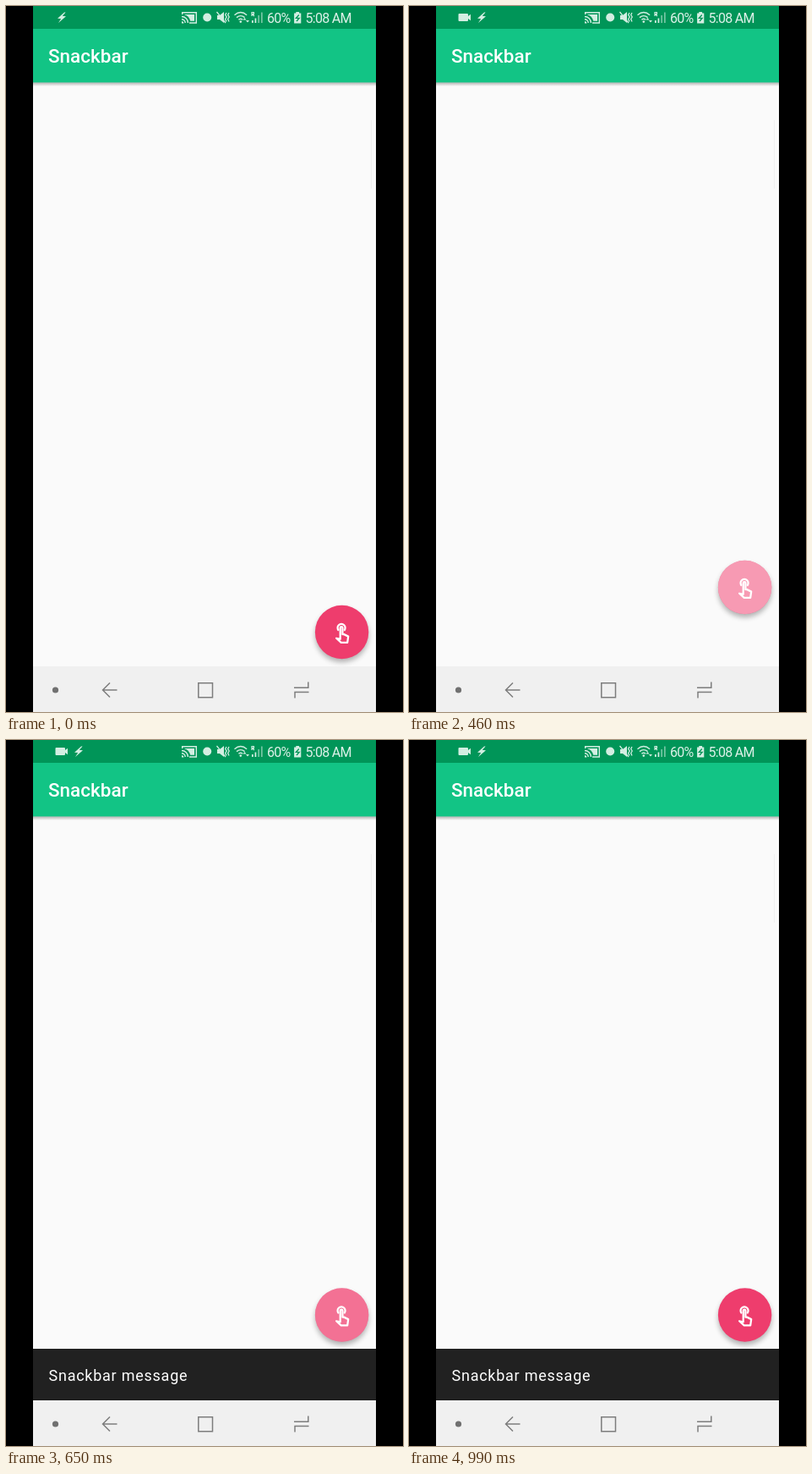
These frames come from a looping animation (470 px wide and 835 px high, 1050 ms). An HTML page:

```html
<!DOCTYPE html>
<html lang="en">
<head>
<meta charset="utf-8">
<title>Snackbar</title>
<style>
  html, body { margin: 0; width: 100%; height: 100%; overflow: hidden; background: #000; }
  svg { display: block; width: 470px; height: 835px; }
  text { font-family: Roboto, "Open Sans", sans-serif; fill: #fff; }
  .line { fill: none; }
</style>
</head>
<body>
<svg viewBox="0 0 470 835">
  <defs>
    <filter id="blur" x="-40%" y="-40%" width="180%" height="180%"><feGaussianBlur stdDeviation="3.2"/></filter>
    <linearGradient id="fade" x2="0" y2="1">
      <stop stop-color="#000" stop-opacity=".28"/><stop offset="1" stop-color="#000" stop-opacity="0"/>
    </linearGradient>
  </defs>

  <rect x="32" width="406" height="835" fill="#fafafa"/>
  <rect x="432" y="135" width="1" height="81" fill="#f0f0f0"/>
  <rect x="32" width="406" height="27" fill="#009558"/>
  <rect x="32" y="27" width="406" height="63.5" fill="#12c485"/>
  <rect x="32" y="90.5" width="406" height="4.5" fill="url(#fade)"/>
  <text x="50" y="67" font-size="22.5" font-weight="500">Snackbar</text>

  <!-- Status bar -->
  <g fill="#d3eee2" stroke="#d3eee2" stroke-width="0">
    <path id="bolt" d="M3 -6L-5 1.2L-.8 1.6L-4 6.5L5 -1.2L.8 -1.8L4.6 -6Z"/>
    <path id="camera" d="M59.5 9H69q1 0 1 1v2l3-2.2v7.4L70 15v2q0 1-1 1H59.5q-1 0-1-1v-7q0-1 1-1Z"/>
    <g stroke-width="1.4">
      <path class="line" d="M208.7 10V7.7H225.3V20H217M208 12.5a7.5 7.5 0 0 1 7.5 7.5M208 15.8a4.2 4.2 0 0 1 4.2 4.2"/>
      <path stroke="none" d="M211.5 10H223V17.8H218.3Q216.5 11.5 211.5 10.5ZM208 18v2.6h2.6Q210.4 18.2 208 18Z"/>
    </g>
    <circle cx="238.2" cy="13.5" r="5"/>
    <path d="M250 11h3l5-4v13l-5-4h-3Z"/>
    <path class="line" stroke-width="1.3" d="M249.5 7L260 20M261 8l-1.3 2.5l1.5 2.5l-1.5 2.5l1.3 3M264 8l-1.3 2.5l1.5 2.5l-1.5 2.5l1.3 3"/>
    <path class="line" stroke-width="1.4" d="M270.5 10.8q7.3-6.5 14.6 0M273 13.6q4.8-4 9.6 0M275.4 16.2q2.4-1.8 4.8 0"/>
    <circle cx="277.8" cy="18.6" r="1.3"/>
    <path d="M280.5 16.5l2-2.5l2 2.5ZM284 17l2 2.5l2-2.5Z"/>
    <path class="line" stroke-width="1.2" d="M291 12V7.5h2.4v2.2H291M292 9.8l1.8 2.2"/>
    <path d="M291 17h1.7v3H291ZM294.6 14.5h1.7V20h-1.7Z"/>
    <path opacity=".55" d="M298.3 11h1.7v9h-1.7ZM302 7.5h1.7V20H302Z"/>
    <path d="M343.3 7h3.8v1.5h2.2v12h-8.2v-12h2.2Z"/>
    <path class="line" stroke="#009558" stroke-width="1.3" d="M346.8 10.5l-3.4 3.8h3.8l-3.2 3.7"/>
  </g>
  <g font-size="16" letter-spacing="-.7" fill-opacity=".87">
    <text x="309" y="19.5">60%</text>
    <text x="354.5" y="19.5">5:08 AM</text>
  </g>

  <!-- Floating button -->
  <g id="fab">
    <circle cy="4" r="31.5" opacity=".3" filter="url(#blur)"/>
    <circle r="31.7" fill="#ee3d6d"/>
    <circle id="ripple" r="31.7" fill="#fff"/>
    <g class="line" stroke="#fff" stroke-width="2" stroke-linejoin="round" transform="translate(-13.5 -13.5) scale(1.128)">
      <path d="M8.7 10.4A4 4 0 1 1 14.3 10.4"/>
      <path d="M10.3 19.3V7.6a1.2 1.2 0 0 1 2.4 0V14.3h1.5l4.5 2.2l-.9 6.4H11.2L6.2 18.4Z"/>
    </g>
  </g>
  <circle id="touch" cx="396.3" r="11.8" fill="#f2f2f2" stroke="#c9c3c4" stroke-width="1"/>

  <g id="snack">
    <rect x="32" y="720" width="406" height="61" fill="#212121"/>
    <text x="50.5" y="757.5" font-size="18" letter-spacing=".75">Snackbar message</text>
  </g>

  <!-- Navigation bar -->
  <rect x="32" y="781" width="406" height="54" fill="#f0f0f0"/>
  <circle cx="58.5" cy="809" r="3.6" fill="#707070"/>
  <g class="line" stroke="#7d7d7d" stroke-width="1.5">
    <path d="M131.5 809H114.5M123 800.5L114.5 809L123 817.5"/>
    <path d="M232 817.8H227.8V800.8H244.5V817.8H239V817.8H232"/>
    <path d="M341 806.2H357.8V799.5M358.5 811.5H342V818.5"/>
  </g>
</svg>
<script>
const $ = id => document.getElementById(id);
const loop = 1050;
const ticks = [0, 80, 140, 200, 270, 330, 400, 460, 520, 580, 650, 720, 780, 860, 920, 990];

// Linear interpolation through [time, value] points
function track(t, points) {
  const i = points.findIndex(p => p[0] > t);
  if (i === 0) return points[0][1];
  if (i < 0) return points[points.length - 1][1];
  const [t0, a] = points[i - 1], [t1, b] = points[i];
  return a + (b - a) * (t - t0) / (t1 - t0);
}

function draw(t) {
  const boltX = track(t, [[50, 66], [200, 86]]);
  $("bolt").setAttribute("transform", `translate(${boltX} 13.5)`);
  $("camera").setAttribute("opacity", track(t, [[80, 0], [200, .75], [270, 1]]));

  const fabY = track(t, [[200, 740.5], [270, 735], [330, 720], [400, 700], [460, 687.5], [520, 681.5], [580, 680]]);
  $("fab").setAttribute("transform", `translate(397.6 ${fabY})`);
  $("ripple").setAttribute("opacity", track(t, [[270, 0], [330, .02], [460, .48], [580, .31], [780, .19], [990, 0]]));

  $("touch").setAttribute("cy", track(t, [[200, 742.5], [330, 747]]));
  $("touch").setAttribute("opacity", track(t, [[80, 0], [200, .85], [270, .75], [330, .52], [430, 0]]));
  $("snack").setAttribute("visibility", t >= 580 ? "visible" : "hidden");
}

function frame() {
  const now = performance.now() % loop;
  draw(ticks.findLast(tick => tick <= now));
  requestAnimationFrame(frame);
}
frame();
</script>
</body>
</html>
```
